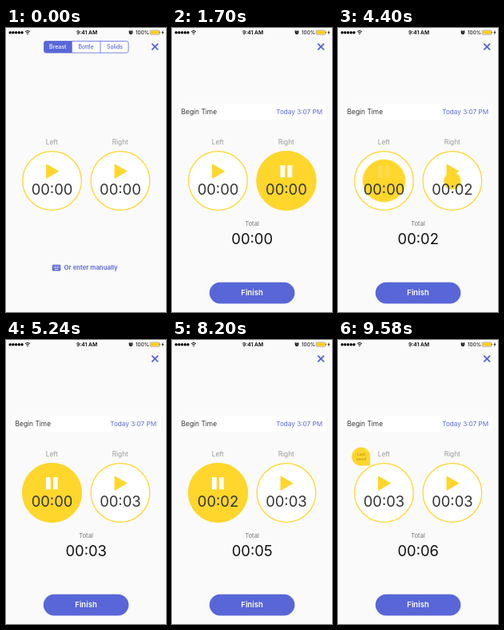
These frames come from a looping animation (200x356 px, 9.9 s). An HTML page:

```html
<!DOCTYPE html>
<html lang="en">
<head>
<meta charset="utf-8">
<title>Feeding timer</title>
<style>
  html, body { margin: 0; width: 100%; height: 100%; overflow: hidden; background: #fafafa; }
  svg { display: block; width: 100vw; height: 100vh; font-family: Inter, sans-serif; }
  .blue { fill: #5866d8; }
  .yellow { fill: #ffd62b; }
  .mid { text-anchor: middle; }
  .bold { font-weight: 600; }
  .label { font-size: 8.3px; fill: #999; }
  .digits { font-size: 18.4px; fill: #333; text-anchor: middle; }

  .anim { animation: 9.9s ease-in-out infinite both; }
  .fill { transform-box: fill-box; transform-origin: center; }
  #fillL { animation-name: fill-left; }
  #fillR { animation-name: fill-right; }
  #pauseL { animation-name: pause-left; }
  #pauseR { animation-name: pause-right; }
  #tabs { animation-name: tabs-out; }
  #manual { animation-name: fade-out; }
  .running { animation-name: fade-in; }
  #badge { animation-name: badge-in; }

  @keyframes fill-right {
    0%, .5% { transform: scale(0); }
    3.8%, 42.5% { transform: scale(1); }
    45.6%, 100% { transform: scale(0); }
  }
  @keyframes fill-left {
    0%, 42.5% { transform: scale(0); }
    45.6%, 83.5% { transform: scale(1); }
    86.6%, 100% { transform: scale(0); }
  }
  @keyframes pause-right {
    0%, 1.8% { opacity: 0; }
    3.6%, 42.5% { opacity: 1; }
    44%, 100% { opacity: 0; }
  }
  @keyframes pause-left {
    0%, 44% { opacity: 0; }
    45.6%, 83.5% { opacity: 1; }
    84.8%, 100% { opacity: 0; }
  }
  @keyframes tabs-out {
    0%, .5% { opacity: 1; transform: none; }
    4.5%, 100% { opacity: 0; transform: translateY(-8px); }
  }
  @keyframes fade-out {
    0%, .5% { opacity: 1; }
    4.5%, 100% { opacity: 0; }
  }
  @keyframes fade-in {
    0%, 1.5% { opacity: 0; }
    6.5%, 100% { opacity: 1; }
  }
  @keyframes badge-in {
    0%, 83.5% { opacity: 0; }
    86.6%, 100% { opacity: 1; }
  }
</style>
</head>
<body>
<svg viewBox="0 0 200 356">
  <defs>
    <path id="play" class="yellow" d="M50.6 170.9 L65.4 179.6 L50.6 188.3 Z"
      stroke="#ffd62b" stroke-width="1" stroke-linejoin="round"/>
    <path id="bars" fill="#fff" d="M50 172h5.7v15.2H50z M59 172h5.7v15.2H59z"/>
    <circle id="ring" cx="57.5" cy="191.5" r="36.8" fill="#fff" stroke="#ffd62b" stroke-width="1.3"/>
  </defs>
  <rect width="200" height="356" fill="#fafafa"/>

  <g>
    <g id="dots"></g>
    <g fill="none" stroke="#111" stroke-width="1">
      <path d="M24 4.6 Q27 2 30 4.6 M25.2 6 Q27 4.4 28.8 6"/>
      <circle cx="27" cy="7.4" r=".4"/>
    </g>
    <text class="mid bold" x="101" y="8" font-size="6.7">9:41 AM</text>
    <circle cx="156" cy="5.8" r="2.3" fill="#111"/>
    <path d="M156 4.6v1.3h1" fill="none" stroke="#fafafa" stroke-width=".5"/>
    <path d="M153.4 4.3l1.5-1.4 M158.6 4.3l-1.5-1.4" stroke="#111" stroke-width=".9"/>
    <text x="162" y="8" font-size="6.4">100%</text>
    <rect x="180.2" y="3" width="11.4" height="5.2" rx=".9" fill="#fafafa" stroke="#555" stroke-width=".5"/>
    <rect x="180.9" y="3.6" width="10" height="4" rx=".4" fill="#fc0"/>
    <path d="M192.2 4.7h.8v1.8h-.8z" fill="#555"/>
    <path d="M196.6 2.8l-2.2 3.2h1.4l-.6 2.6 2.3-3.3h-1.4z" fill="#111"/>
  </g>

  <path d="M182.3 19.6l7.8 7.8 M190.1 19.6l-7.8 7.8" stroke="#5866d8" stroke-width="1.9"/>

  <g id="tabs" class="anim mid" font-size="6.9" font-weight="500">
    <rect x="47.5" y="16.5" width="105.5" height="14.6" rx="2.5" fill="#fff" stroke="#5866d8" stroke-width=".8"/>
    <path class="blue" d="M50 16.5h32.7v14.6H50a2.5 2.5 0 0 1-2.5-2.5V19a2.5 2.5 0 0 1 2.5-2.5z"/>
    <path d="M118 16.5v14.6" stroke="#5866d8" stroke-width=".8"/>
    <text x="64.7" y="26.3" fill="#fff">Breast</text>
    <text class="blue" x="100" y="26.3">Bottle</text>
    <text class="blue" x="136" y="26.3">Solids</text>
  </g>

  <g class="anim running" font-size="8.2">
    <rect x="7.5" y="94" width="186.3" height="22" rx="1.5" fill="#fff" stroke="#f3f3f3" stroke-width=".6"/>
    <text x="11.6" y="107.8" font-size="8.4" fill="#333">Begin Time</text>
    <text class="blue" x="188.2" y="107.8" text-anchor="end">Today 3:07 PM</text>
  </g>

  <text class="label mid" x="57.3" y="146.4">Left</text>
  <text class="label mid" x="142.8" y="146.4">Right</text>

  <g>
    <use href="#ring"/>
    <use href="#play"/>
    <circle id="fillL" class="anim fill yellow" cx="57.5" cy="191.5" r="37.4"/>
    <g id="pauseL" class="anim"><use href="#bars"/></g>
    <text id="left" class="digits" x="57.5" y="208.9">00:00</text>
  </g>
  <g transform="translate(85.4 0)">
    <use href="#ring"/>
    <use href="#play"/>
    <circle id="fillR" class="anim fill yellow" cx="57.5" cy="191.5" r="37.4"/>
    <g id="pauseR" class="anim"><use href="#bars"/></g>
    <text id="right" class="digits" x="57.5" y="208.9">00:00</text>
  </g>

  <g id="badge" class="anim mid" font-size="5.3" fill="#b58a1c">
    <path class="yellow" d="M40.2 157.6H28.7A11.5 11.5 0 1 1 40.2 146.1z"/>
    <text x="29" y="145">Last</text>
    <text x="29" y="151.3">used</text>
  </g>

  <g class="anim running">
    <text class="mid" x="100" y="247.5" font-size="7.7" fill="#777">Total</text>
    <text id="total" class="digits" x="100.2" y="270.9" style="fill:#111">00:00</text>
    <rect class="blue" x="46.8" y="318.8" width="106.6" height="26.6" rx="13.3"/>
    <text class="mid bold" x="100" y="335.3" font-size="9.5" fill="#fff">Finish</text>
  </g>

  <g id="manual" class="anim">
    <rect class="blue" x="57.8" y="296.7" width="10.4" height="7.8" rx="1.2"/>
    <path d="M59.5 298.8h7.2 M59.5 300.5h7.2" stroke="#fff" stroke-width=".9" stroke-dasharray="1 .55"/>
    <path d="M60.7 302.6h4.7" stroke="#fff" stroke-width=".9"/>
    <text class="blue bold" x="72.6" y="303.4" font-size="7.8">Or enter manually</text>
  </g>
</svg>
<script>
  const LOOP = 9900;
  const TICKS = { right: [2920, 4220, 4440], left: [5620, 6960, 8200] };
  const $ = id => document.getElementById(id);

  for (let i = 0; i < 5; i++) {
    const dot = document.createElementNS("http://www.w3.org/2000/svg", "circle");
    dot.setAttribute("cx", 5.2 + i * 3.7);
    dot.setAttribute("cy", 5.7);
    dot.setAttribute("r", 1.7);
    $("dots").append(dot);
  }

  const show = (id, n) => {
    const text = "00:0" + n;
    if ($(id).textContent !== text) $(id).textContent = text;
  };
  // Counters share the clock of the CSS animations.
  const clock = $("fillR").getAnimations()[0];

  function draw() {
    const t = (clock.currentTime || 0) % LOOP;
    const count = side => TICKS[side].filter(tick => tick <= t).length;
    const left = count("left"), right = count("right");
    show("left", left);
    show("right", right);
    show("total", left + right);
    requestAnimationFrame(draw);
  }
  draw();
</script>
</body>
</html>
```
